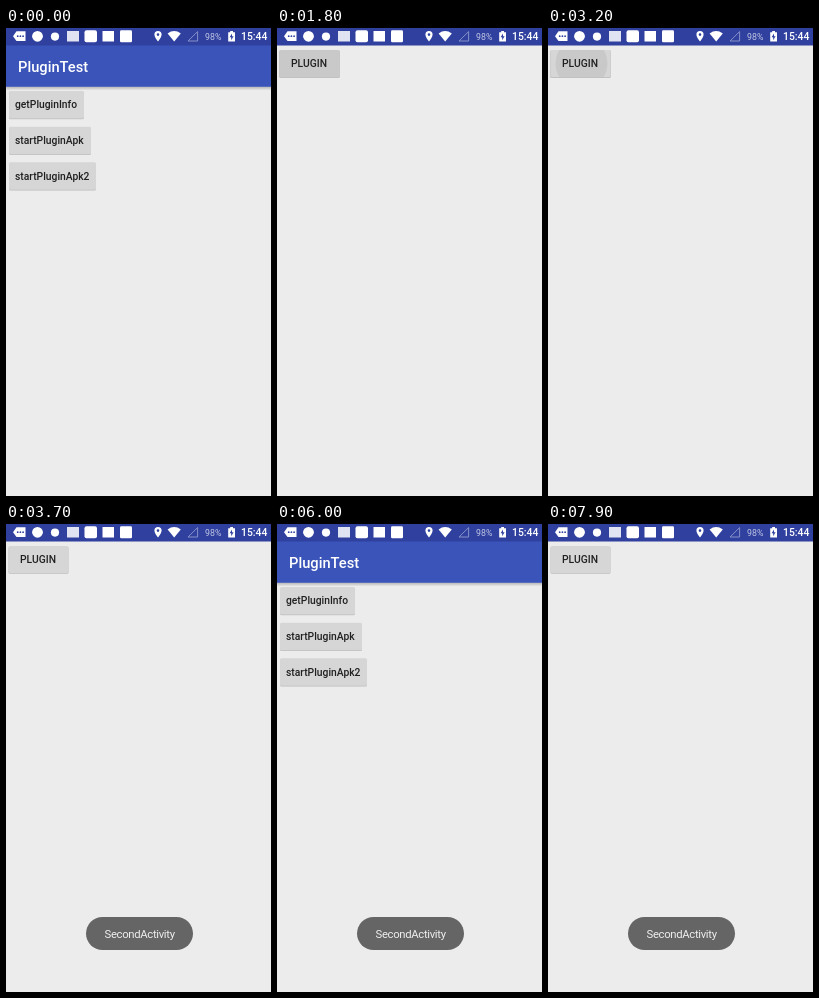
An HTML page that plays this animation: 265x468 px, repeating every 8 s.

```html
<!DOCTYPE html>
<html lang="en">
<head>
<meta charset="utf-8">
<title>Plugin screens</title>
<style>
  html, body { margin: 0; width: 100%; height: 100%; overflow: hidden; background: #ececec; }
  svg { display: block; width: 100%; height: 100%; }
  text { font-family: Roboto, "Noto Sans", sans-serif; }
  .label { font-size: 10.3px; font-weight: 500; fill: #202020; }
</style>
</head>
<body>
<svg viewBox="0 0 265 468">
  <defs>
    <linearGradient id="barShadow" x2="0" y2="1">
      <stop stop-color="#000" stop-opacity=".24"/>
      <stop offset="1" stop-color="#000" stop-opacity="0"/>
    </linearGradient>
  </defs>

  <g id="home">
    <rect width="265" height="468" fill="#ececec"/>
    <rect y="58.5" width="265" height="4" fill="url(#barShadow)"/>
    <rect y="17" width="265" height="41.8" fill="#3b54b9"/>
    <rect width="265" height="17.5" fill="#2f409f"/>
    <text x="12" y="44" font-size="14.7" font-weight="500" fill="#fff">PluginTest</text>
  </g>
  <g id="first"></g>
  <g id="second"></g>

  <g id="status" fill="#fff">
    <path d="M7 8.2 10.5 3.3H19.5V13H10.5Z"/>
    <g fill="#2f409f">
      <circle cx="11.7" cy="8.2" r=".9"/><circle cx="14.4" cy="8.2" r=".9"/><circle cx="17.1" cy="8.2" r=".9"/>
    </g>
    <circle cx="31.5" cy="8.3" r="5.4"/>
    <circle cx="49" cy="8.6" r="4.1"/>
    <rect x="61" y="3" width="12" height="10.5" opacity=".85"/>
    <rect x="78.5" y="2.3" width="12.5" height="12" rx="2"/>
    <rect x="96.5" y="3" width="11.5" height="10.5"/>
    <rect x="114" y="2.3" width="12" height="12" rx="1.3"/>
    <path fill-rule="evenodd" d="M152 13.5C149.8 10.8 148.4 8.6 148.4 6.6A3.6 3.6 0 0 1 155.6 6.6C155.6 8.6 154.2 10.8 152 13.5ZM152 5.3A1.3 1.3 0 1 0 152 7.9A1.3 1.3 0 1 0 152 5.3Z"/>
    <path d="M161.6 5.5Q168.2 .6 174.8 5.5L168.2 13.5Z"/>
    <path d="M182 13H191.6V3.6Z" fill="none" stroke="#8791c8" stroke-width="1"/>
    <text x="199" y="11.7" font-size="8.8" fill="#c4c9e6">98%</text>
    <path d="M222.2 4.2H224.2V3H227V4.2H229V13.6H222.2Z"/>
    <path d="M226 5.4 223.6 9.3H225.2V12.3L227.6 8.3H226Z" fill="#2f409f"/>
    <text x="235" y="12.2" font-size="10.4" font-weight="500">15:44</text>
  </g>

  <g id="toast">
    <rect x="80" y="393" width="107" height="33" rx="16.5" fill="#656565"/>
    <text x="98.5" y="413.6" font-size="11.3" letter-spacing="-.32" fill="#efefef">SecondActivity</text>
  </g>
</svg>
<script>
const LOOP = 8000, STEP = 100, SLIDE = 468 * 0.08;
const $ = id => document.getElementById(id);
const clamp = v => Math.min(1, Math.max(0, v));

function add(parent, tag, attrs, text) {
  const node = document.createElementNS('http://www.w3.org/2000/svg', tag);
  for (const key in attrs) node.setAttribute(key, attrs[key]);
  if (text) node.textContent = text;
  return parent.appendChild(node);
}

let buttonCount = 0;
function addButton(parent, label, x, y, width, height, textX, press) {
  const clip = 'button' + buttonCount++;
  const box = { x, y, width, height, rx: 1.5 };
  add(add(parent, 'clipPath', { id: clip }), 'rect', box);
  const lift = add(parent, 'rect', { ...box, x: x - .5, width: width + 1, height: height + 1, fill: '#000' });
  add(parent, 'rect', { ...box, y: y + .7, fill: '#bebebe' });
  add(parent, 'rect', { ...box, fill: '#d6d6d6' });
  const ripple = add(parent, 'circle', {
    cx: x + width / 2 + 1, cy: y + height / 2, fill: '#000', 'clip-path': `url(#${clip})`
  });
  add(parent, 'text', { class: 'label', x: textX, y: y + height / 2 + 3.6 }, label);
  return { lift, ripple, press };
}

function addPluginScreen(id, press) {
  const screen = $(id);
  add(screen, 'rect', { width: 265, height: 468, fill: '#ececec' });
  add(screen, 'rect', { width: 265, height: 17.5, fill: '#2f409f' });
  return addButton(screen, 'PLUGIN', 2.5, 22, 60, 27, 14, press);
}

// press: start, end and first ripple radius
const buttons = [
  addButton($('home'), 'getPluginInfo', 3, 63, 75, 27.5, 9),
  addButton($('home'), 'startPluginApk', 3, 98.8, 82, 27.5, 9, [400, 700, 60]),
  addButton($('home'), 'startPluginApk2', 3, 134.3, 87, 27.5, 9, [6500, 7100, 20]),
  addPluginScreen('first', [1800, 2100, 60]),
  addPluginScreen('second', [3200, 3700, 26])
];

// Each visit: when the screen starts to open and to close
const visits = {
  first: [[583, 5741]],
  second: [[1983, 5041], [6983, Infinity]]
};

function screenPose(t, [open, close]) {
  if (t < open || t >= close + 250) return { alpha: 0, shift: 0 };
  if (t >= close) {
    const age = t - close;
    return { alpha: 1 - clamp((age - 100) / 150), shift: SLIDE * (age / 250) ** 4 };
  }
  const age = t - open;
  return {
    alpha: 1 - (1 - clamp(age / 200)) ** 4,
    shift: SLIDE * (1 - clamp(age / 350)) ** 5
  };
}

function drawButton({ lift, ripple, press }, t) {
  const [start, end, radius] = press || [0, 0, 0];
  const down = t >= start && t < end;
  const fade = down ? clamp((end - t) / 200) : 0;
  lift.setAttribute('opacity', 0.14 * fade);
  ripple.setAttribute('r', radius + (t - start) * 0.12 * down);
  ripple.setAttribute('opacity', 0.06 * fade);
}

function render(time) {
  const t = Math.floor(time % LOOP / STEP) * STEP;
  for (const id in visits) {
    const pose = visits[id].map(v => screenPose(t, v)).find(p => p.alpha > 0);
    $(id).setAttribute('opacity', pose ? pose.alpha : 0);
    $(id).setAttribute('transform', `translate(0 ${pose ? pose.shift : 0})`);
  }
  buttons.forEach(b => drawButton(b, t));
  $('toast').setAttribute('opacity', clamp((t - 3300) / 400));
}

const began = performance.now();
function tick() {
  render(performance.now() - began);
  requestAnimationFrame(tick);
}
tick();
</script>
</body>
</html>
```
